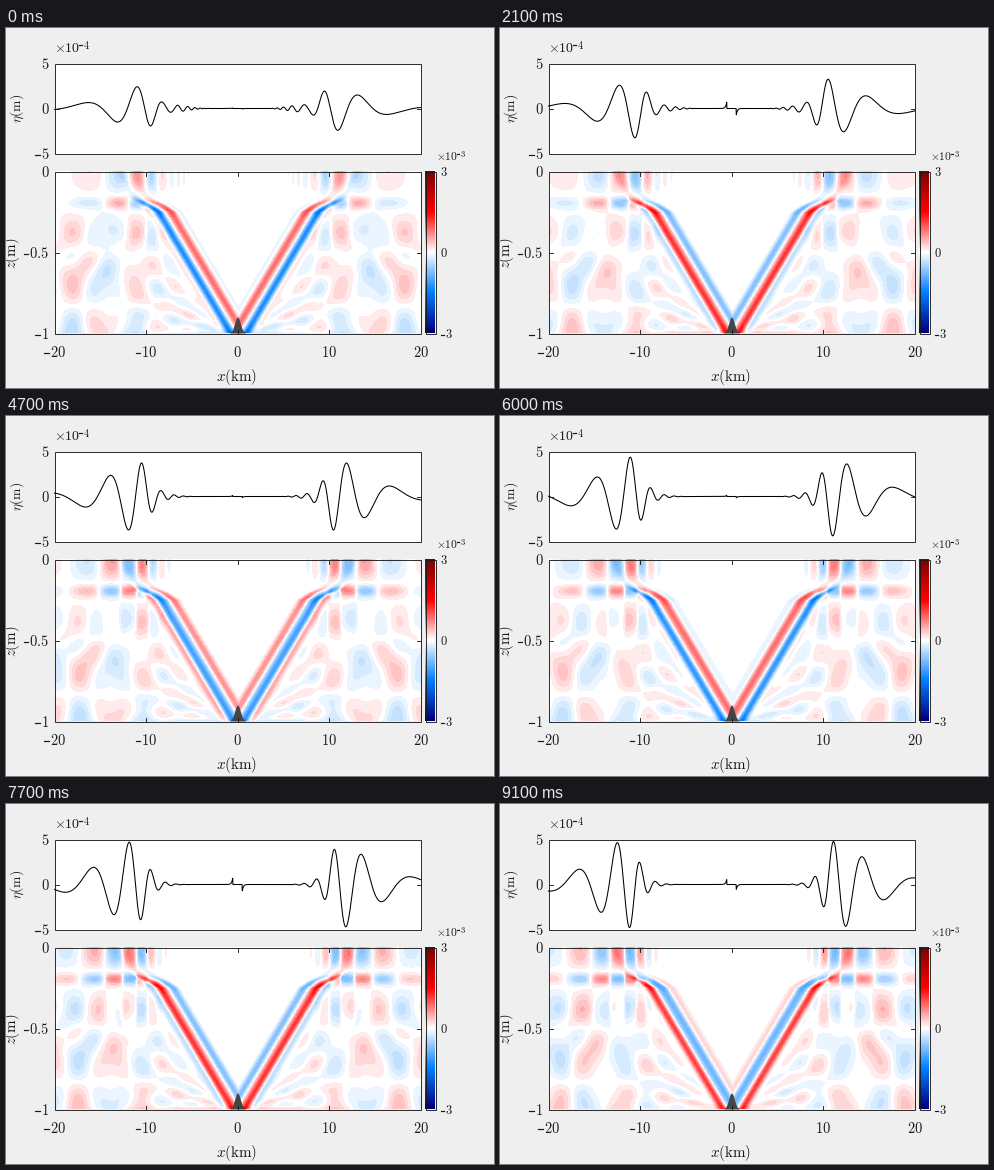
A matplotlib script that plays this animation: 488 by 360 pixels, repeating every 9.2 s.

```python
import numpy as np
import matplotlib.pyplot as plt
from matplotlib.animation import FuncAnimation
from matplotlib.colors import LinearSegmentedColormap
from matplotlib.patches import Rectangle

plt.rcParams["mathtext.fontset"] = "cm"

W, H, DPI = 488, 360, 80
FRAMES, INTERVAL = 92, 100
PERIOD = 5.6                         # seconds per forcing cycle
LEFT, RIGHT, MID = 48, 414, 231
KM = (RIGHT - LEFT) / 40             # pixels per kilometre
ETA_TOP, ETA_MID, ETA_BOTTOM = 35, 80, 125
TOP, MIDDLE, BOTTOM = 143, 224, 305
BAR = (419, 429)
INK = "0.1"


def wave(phase):
    return np.cos(2 * np.pi * phase)


def bump(v, centre, width):
    return np.exp(-((v - centre) / width) ** 2)


def step(v, centre, width):
    return 1 / (1 + np.exp(-(v - centre) / width))


def surface(r, t):
    """Dispersive wave train at distance r (km): it stretches as it spreads."""
    r = np.maximum(r, 1)
    phase = 32.25 * (1 + t / 17.3) / r - 2.43
    packet = (2.6 + 0.49 * t) * np.exp((11 - r) / 4) * step(r, 9.45 + 0.13 * t, 0.6)
    tail = 0.3 * np.exp(-t / 7) * bump(r, 6.5 + 0.3 * t, 1.8)
    return (packet + tail) * wave(phase)


def spikes(r, t):
    size = 0.47 + 0.43 * wave((t - 2.5) / PERIOD)
    return -size * np.where(r > 0.5, np.exp((0.5 - r) / 0.12), 0)


# Fixed geometry of the section, in pixels.
off = np.abs(np.arange(LEFT, RIGHT) + 0.5 - MID - 0.5)[None, :]
depth = (np.arange(BOTTOM - TOP) + 0.5)[:, None]
height = BOTTOM - TOP - depth
angle = np.arctan2(height, off)
across = off - np.interp(depth, [0, 28, 34, 41, 162], [112, 95, 83, 73, 1])
beam_shape = (1.3 * bump(across, 7, 7) + 0.8 * bump(across, -6, 7)) \
    * (0.1 + 0.9 * step(depth, 31, 2.5)) * (1 + 0.3 * bump(depth, 38, 7))
deep = step(across, 24, 5) * step(depth, 51, 8)
far = np.clip((off - 60) / 60, 0, 1)


def velocity(t):
    cycle = t / PERIOD
    beam = beam_shape * wave((across + 6) / 26 - cycle)

    eta = surface(off / KM, t)
    upper = -0.85 * np.tanh(eta / 3) * step(-depth, -17, 4)
    pycnocline = 0.75 * np.tanh(eta / 1.8) * bump(depth, 32, 6)
    below = -0.2 * np.tanh(eta / 1.5) * bump(depth, 61, 16)
    layers = upper + (pycnocline + below) * step(across, 2, 5)

    tilt = 0.5 * step(-depth, -86, 8)
    cells = 0.32 * far * wave((off - 136) / 64 - cycle + tilt) * wave(height / 108)
    ripples = 0.1 * wave(off / 33 - cycle) * wave(depth / 60)
    fan = -0.16 * (1 - far) * wave((angle - 0.2) / 0.3 + cycle)
    floor = 0.6 * wave((t - 2.6) / PERIOD) * step(across, 2, 3) \
        * np.exp(-off / 60 - height / 5)

    u = beam + layers + deep * (cells + ripples + fan) + floor
    return np.round(u / 0.12) * 0.12


cmap = LinearSegmentedColormap.from_list(
    "bluewhitered",
    [(0, 0, .5), (0, .5, 1), (1, 1, 1), (1, 0, 0), (.5, 0, 0)], N=257)

fig = plt.figure(figsize=(W / DPI, H / DPI), dpi=DPI, facecolor="0.937")
ax = fig.add_axes([0, 0, 1, 1])


def points(pixels):
    return pixels * 72 / DPI


def line(xs, ys, width=0.9, color=INK, **kw):
    return ax.plot(xs, ys, color=color, lw=points(width), **kw)[0]


def box(x0, y0, x1, y1, face="none", z=4):
    ax.add_patch(Rectangle((x0 + .5, y0 + .5), x1 - x0, y1 - y0, fc=face,
                           ec=INK, lw=points(0.9), zorder=z))


def text(x, y, s, size, **kw):
    kw = {"ha": "center", "va": "center", "color": INK, **kw}
    ax.text(x, y, f"${s}$", fontsize=points(size), **kw)


def number(x, y, s, size=14.5, align="center"):
    """Number with a short hyphen as its sign; x is centre, left or right."""
    digits = s.lstrip("-")
    width = size * (0.5 * len(digits) - 0.22 * ("." in digits))
    sign = 0.4 * size if s != digits else 0
    start = x - {"left": 0, "center": .5, "right": 1}[align] * (width + sign)
    text(start + sign, y, rf"\mathrm{{{digits}}}", size, ha="left",
         va="center_baseline")
    if sign:
        line([start + .5, start + sign - 1], [y + 1.5] * 2, 1.2)


def power(x, y, exponent, size):
    text(x, y, r"\times 10", size, ha="left")
    number(x + 1.78 * size, y - 0.3 * size, exponent, 0.75 * size, "left")


def tick(x, y, dx, dy):
    line([x + .5, x + dx + .5], [y + .5, y + dy + .5], zorder=5)


box(LEFT, ETA_TOP, RIGHT, ETA_BOTTOM, "white", 1)
eta_line = line([], [], 1.05, "black", zorder=3)
field = ax.imshow(velocity(0), extent=(LEFT + .5, RIGHT + .5, BOTTOM + .5, TOP + .5),
                  cmap=cmap, vmin=-3, vmax=3, interpolation="bilinear", zorder=1)
ax.imshow(np.linspace(3, -3, 64)[:, None], extent=(*BAR, BOTTOM, TOP),
          cmap=cmap, vmin=-3, vmax=3, zorder=1)
ridge = np.linspace(-8, 8, 65)
ax.fill_between(MID + .5 + ridge, BOTTOM, BOTTOM - 16 * bump(ridge, 0, 4),
                color="0.27", lw=0, zorder=3)
box(LEFT, TOP, RIGHT, BOTTOM)
box(BAR[0], TOP, BAR[1], BOTTOM)

for row, label in zip((ETA_TOP, ETA_MID, ETA_BOTTOM), ("5", "0", "-5")):
    number(42, row, label, align="right")
for row, label, bar_label in zip((TOP, MIDDLE, BOTTOM), ("0", "-0.5", "-1"),
                                 ("3", "0", "-3")):
    number(42, row, label, align="right")
    number(434, row, bar_label, 12.5, "left")
for row in (ETA_MID, MIDDLE):
    tick(LEFT, row, 4, 0)
    tick(RIGHT, row, -4, 0)
for km in range(-20, 21, 10):
    column = MID + km * KM
    number(column, 323, str(km))
    if abs(km) < 20:
        tick(column, BOTTOM, 0, -4)
        tick(column, TOP, 0, 4)

power(48, 20, "-4", 14)
power(430, 128, "-3", 11.5)
text(MID, 349, r"x\mathrm{(km)}", 15)
text(6.5, 225, r"z\mathrm{(m)}", 15, rotation=90)
text(11.5, 80, r"\eta\mathrm{(m)}", 13.5, rotation=90)

ax.set(xlim=(0, W), ylim=(H, 0), aspect="auto")
ax.axis("off")

km_axis = np.linspace(-20, 20, 1601)


def update(i):
    t = i * INTERVAL / 1000
    r = np.abs(km_axis)
    eta = np.sign(km_axis) * (surface(r, t) + spikes(r, t))
    eta_line.set_data(MID + .5 + km_axis * KM,
                      ETA_MID + .5 - 9 * np.clip(eta, -5, 5))
    field.set_data(velocity(t))
    return eta_line, field


anim = FuncAnimation(fig, update, frames=FRAMES, interval=INTERVAL,
                     repeat=True, repeat_delay=0)
plt.show()
```
